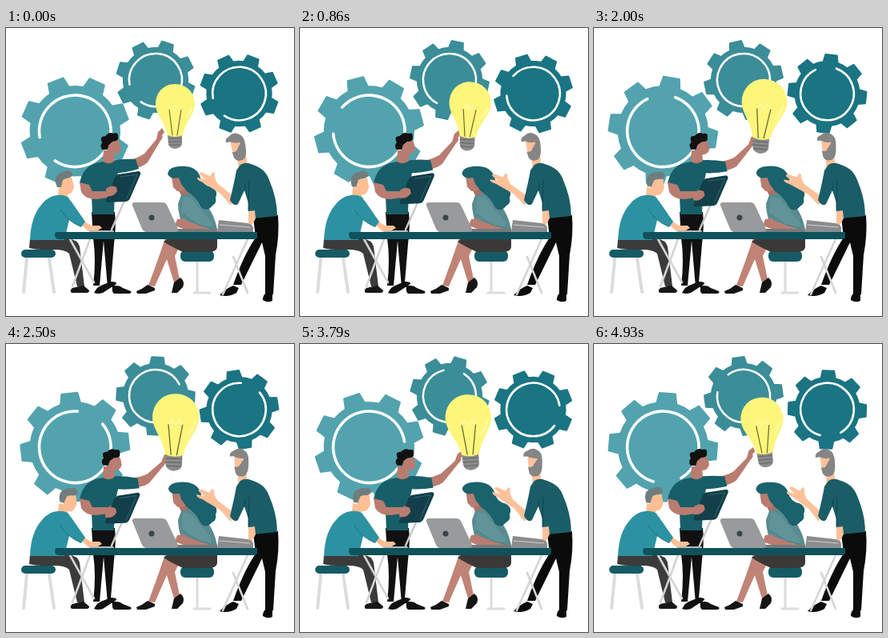
Animation, 360 px wide and 360 px high, one loop 5 s. Source, as an HTML page:

```html
<!DOCTYPE html>
<html lang="en">
<head>
<meta charset="utf-8">
<title>Team idea</title>
<style>
html, body { margin: 0; width: 100%; height: 100%; overflow: hidden; background: #fff; }
svg { display: block; width: 100vw; height: 100vh; }
.line { fill: none; stroke-linecap: round; stroke-linejoin: round; }
</style>
</head>
<body>
<svg viewBox="0 0 360 360">
  <g id="gears"></g>

  <!-- standing presenter -->
  <path fill="#111" d="M107 230H136Q138 247 135 270L131 318L138 324H127L122 266L117 322H109Q113 290 109 263Z"/>
  <path fill="#111" d="M110 331Q114 323 121 321L131 317Q139 317 138 320L121 331Q115 333 110 331ZM133 323Q141 320 146 325L156 329Q158 332 153 332H135Q132 330 133 323Z"/>
  <g id="reach">
    <path fill="#b97c70" d="M154 165Q164 163 173 157L188 139L190 130L195 125L198 130L195 134Q197 137 193 141L177 168Q170 175 151 178Z"/>
    <path fill="#175e68" d="M124 168Q142 163 162 164L166 176Q151 181 132 182Z"/>
  </g>
  <path fill="#175e68" d="M121 167Q135 164 142 170Q139 188 136 199L135 233H108L107 210L92 194Q96 174 112 169Z"/>
  <path fill="#b97c70" d="M122 153L135 153L136 166Q130 172 121 167Z"/>
  <g id="speakerHead">
    <path fill="#b97c70" d="M125 142Q135 137 142 142L144 150Q143 158 135 158Q126 156 125 142Z"/>
    <path fill="#111" d="M121 152Q117 147 121 143Q117 135 125 135Q130 129 135 132Q142 130 141 137Q142 142 134 142L129 146L127 152Z"/>
  </g>
  <path class="line" stroke="#c8cacb" stroke-width="2.5" d="M132 252L148 216"/>
  <path fill="#b97c70" d="M92 193L104 196L108 204L128 204L137 199L139 204L134 211L113 214Q99 214 94 205Z"/>
  <g id="tablet">
    <path fill="#123f49" d="M140 183L166 179Q169 180 168 183L155 213Q153 217 149 217L127 218Q123 217 126 213L136 187Z"/>
    <path class="line" stroke="#2f666f" stroke-width="1" d="M143 186L164 183L151 213"/>
    <path fill="#b97c70" d="M125 201Q132 195 138 199L139 204Q134 212 125 210Z"/>
  </g>

  <!-- left stool and seated man -->
  <path class="line" stroke="#dadcdd" stroke-width="4" d="M26 288L22 330M54 288L60 330"/>
  <rect x="19" y="277" width="43" height="10" rx="5" fill="#155b65"/>
  <path fill="#3c3b3b" d="M30 263H78Q90 265 92 273L98 323H89L79 282Q74 277 60 277Q40 278 29 275Z"/>
  <path fill="#171717" d="M83 325Q91 323 97 322L104 328Q104 331 101 331H82Q79 328 83 325Z"/>
  <path fill="#fdbf93" d="M66 199L79 202L76 216L65 211Z"/>
  <g id="writerHead">
    <path fill="#fdbf93" d="M66 189Q73 184 82 187L85 197Q84 207 78 208Q68 206 66 189Z"/>
    <path fill="#6f7d7f" d="M64 199Q60 191 63 185Q69 179 79 178L83 181Q84 187 75 188L71 190L69 199Z"/>
  </g>
  <path fill="#2c92a1" d="M64 209Q74 208 79 213Q83 222 79 240L73 265H30Q31 235 45 220Q53 210 64 209Z"/>
  <path fill="#fdbf93" d="M91 243L97 241L106 247L117 247L120 250L113 254H103Z"/>
  <path fill="#2c92a1" d="M69 223Q74 211 81 216L99 242L94 249Q79 243 69 228Z"/>
  <path class="line" stroke="#16707c" stroke-width=".8" d="M68 227Q76 241 93 248"/>

  <!-- seated woman -->
  <path class="line" stroke="#dadcdd" stroke-width="3" d="M239 290V330M235 331H255"/>
  <rect x="218" y="278" width="42" height="14" rx="6" fill="#155b65"/>
  <path fill="#c08476" d="M199 263L219 269L211 285L217 314L210 318L201 289L186 323L178 322L190 289Z"/>
  <path fill="#151515" d="M163 329Q171 326 177 321L186 325V328L175 332H164ZM207 331L210 318L218 312Q224 317 221 324L214 331Z"/>
  <path fill="#3b3938" d="M206 261H264V274Q263 280 253 280H221Q204 272 197 267Z"/>
  <path fill="#ad7064" d="M214 198L229 198L234 214L220 212Z"/>
  <path fill="#588b90" d="M219 209Q231 204 240 211Q259 225 264 252H222Q215 232 215 220Z"/>
  <path fill="#b97c70" d="M214 239L222 238Q231 246 254 246L252 253Q228 255 211 247Z"/>
  <path fill="#619499" d="M221 212Q231 208 239 222L258 244L256 251L239 246L219 232Z"/>
  <path class="line" stroke="#397983" stroke-width=".8" d="M220 232L240 246L257 250"/>
  <g id="womanHead">
    <path fill="#b97c70" d="M207 187Q213 184 220 185L227 199Q221 206 214 204L209 199Z"/>
    <path fill="#1a626c" d="M202 182Q203 174 216 173Q236 171 242 184Q245 197 257 199Q266 204 262 212Q264 219 258 222Q251 231 244 224Q238 211 226 204L219 195L216 187Q205 190 202 182Z"/>
  </g>

  <!-- right man -->
  <path fill="#0b0b0b" d="M309 236L340 234Q342 258 337 284L334 333H324L324 285L320 268L294 321H284Q297 284 312 262Z"/>
  <path fill="#0b0b0b" d="M267 334Q274 326 284 322L291 325L288 331Q278 337 267 334ZM321 340Q321 333 326 331L333 333V341Q327 344 321 340Z"/>
  <path fill="#fdc19a" d="M289 156L300 157L302 176L291 179Z"/>
  <g id="elderHead">
    <path fill="#fdc19a" d="M286 139H300V158H287Z"/>
    <path fill="#858586" d="M286 153Q291 155 293 151L299 143L304 148Q304 162 298 165Q289 167 287 160Z"/>
    <path fill="#858586" d="M281 140Q280 135 286 133Q293 128 299 133Q305 136 304 148L300 151L298 143Q290 143 286 140Z"/>
  </g>
  <g id="gesture">
    <path fill="#fdc19a" d="M281 222L268 207L257 200L246 193Q238 190 239 187L249 189L242 183Q241 180 246 181L255 185L259 180L261 182Q260 188 265 195L285 211Z"/>
  </g>
  <path fill="#1a5d67" d="M293 171Q299 167 306 170Q324 175 329 190Q339 213 339 235L309 238L304 222L298 203L290 220Q285 224 280 215Q286 190 288 178Z"/>
  <path fill="#fdc19a" d="M303 221L310 219L312 238L306 249H303Z"/>
  <path fill="#1a5d67" d="M302 181Q311 178 315 192L312 228L303 229Z"/>
  <path class="line" stroke="#0e444d" stroke-width=".9" d="M304 191L303 228M298 203L299 194"/>

  <!-- table and laptops -->
  <path class="line" stroke="#d2d4d5" stroke-width="2.6" d="M80 264L110 318M105 264L83 323M302 264L271 333M284 286L302 331"/>
  <path fill="#8b8c8d" d="M266 240L302 244Q309 246 309 250V255H264Z"/>
  <path class="line" stroke="#d0d0d0" stroke-width="1" d="M267 246L305 249"/>
  <path fill="#777a7b" d="M173 251H264V256H175Z"/>
  <path fill="#999a9b" d="M161 218H196Q199 218 201 221L215 251Q216 255 211 255H176Q172 255 170 251L158 222Q157 218 161 218Z"/>
  <circle cx="182" cy="237" r="3.5" fill="#35464a"/>
  <path class="line" stroke="#b9bcbd" stroke-width="2" d="M105 254H134"/>
  <path fill="#0f525c" d="M62 255H314V261Q314 264 310 264H66Q61 264 61 258Z"/>

  <!-- bulb -->
  <g id="bulb">
    <path fill="#8b8b8b" d="M202 133H220V145Q219 150 211 151Q204 150 203 145Z"/>
    <path class="line" stroke="#666" stroke-width="1" d="M203 138H219M203 142H219M204 146H218"/>
    <path fill="#fdf67a" d="M211 70C226 70 236 81 236 95C236 108 224 117 221 134Q211 138 202 134C199 117 187 108 187 95C187 81 197 70 211 70Z"/>
    <path class="line" stroke="#6a6540" stroke-width="1.1" d="M204 102L208 134M219 102L214 134"/>
    <path class="line" stroke="#fffab8" stroke-width="1" d="M204 102L208 97L211 103L215 97L219 102"/>
    <path class="line" stroke="#fff9b8" stroke-width="1.5" d="M232 98Q230 107 225 112"/>
  </g>
</svg>
<script>
const LOOP = 5000, STEPS = 70, CYCLE = 6000;
const $ = id => document.getElementById(id);
const SVG = "http://www.w3.org/2000/svg";

const polar = (r, deg) => {
  const a = deg * Math.PI / 180;
  return `${(r * Math.cos(a)).toFixed(2)} ${(r * Math.sin(a)).toFixed(2)}`;
};

function gearPath(r) {
  const root = r * .82, points = [];
  for (let a = 0; a < 360; a += 45) {
    points.push(polar(root, a - 13), polar(r, a - 8.5), polar(r, a + 8.5), polar(root, a + 13));
    points.push(polar(root, a + 22.5));
  }
  return `M${points.join("L")}Z`;
}

function add(parent, tag, attrs) {
  const node = document.createElementNS(SVG, tag);
  for (const key in attrs) node.setAttribute(key, attrs[key]);
  return parent.appendChild(node);
}

const gears = [
  { x: 86.3, y: 128.8, r: 68, ring: 44.8, width: 3.6, color: "#52a3ae", phase: 24, dir: 1 },
  { x: 187, y: 65, r: 49, ring: 33, width: 2.5, color: "#3b8d98", phase: 18, dir: -1 },
  { x: 291.5, y: 82, r: 49, ring: 33.3, width: 2.6, color: "#1a7482", phase: 21, dir: 1 }
];

for (const gear of gears) {
  gear.node = add($("gears"), "g", {});
  add(gear.node, "path", {
    d: gearPath(gear.r), fill: gear.color, stroke: gear.color,
    "stroke-width": 2, "stroke-linejoin": "round"
  });
  const from = polar(gear.ring, 170 - gear.phase), to = polar(gear.ring, 124 - gear.phase);
  add(gear.node, "path", {
    d: `M${from}A${gear.ring} ${gear.ring} 0 1 1 ${to}`,
    class: "line", stroke: "#fff", "stroke-width": gear.width
  });
}

// Linear interpolation through [time, value] stops.
function track(stops, t) {
  const i = stops.findIndex(s => s[0] > t);
  const [t0, a] = stops[i - 1], [t1, b] = stops[i];
  return a + (b - a) * (t - t0) / (t1 - t0);
}

const swell = [[0, 0], [CYCLE / 2, 1], [CYCLE, 0]];
const sway = [[0, 0], [CYCLE / 4, 1], [CYCLE * 3 / 4, -1], [CYCLE, 0]];

// id, stops, start angle, range, pivot
const joints = [
  ["reach", swell, 0, 11, 140, 182],
  ["speakerHead", swell, -2, 6, 129, 162],
  ["writerHead", swell, 0, 15, 72, 214],
  ["womanHead", swell, 0, 2, 228, 210],
  ["elderHead", swell, -11, 11, 295, 172],
  ["gesture", sway, 0, -5, 282, 217]
];

function draw(t) {
  for (const g of gears) {
    const angle = g.phase + g.dir * 360 * t / CYCLE;
    g.node.setAttribute("transform", `translate(${g.x} ${g.y}) rotate(${angle})`);
  }
  for (const [id, stops, start, range, x, y] of joints) {
    $(id).setAttribute("transform", `rotate(${start + range * track(stops, t)} ${x} ${y})`);
  }
  const grow = track(swell, t);
  $("tablet").setAttribute("transform", `translate(${-grow} ${8 * grow})`);
  $("bulb").setAttribute("transform",
    `translate(211.5 110.5) rotate(${7 * track(sway, t)}) scale(${1 + .23 * grow}) translate(-211.5 -110.5)`);
}

const begin = performance.now();
function tick(now) {
  const step = LOOP / STEPS;
  const t = Math.max(0, now - begin) % LOOP;
  draw(Math.floor((t + 2) / step) % STEPS * step);
  requestAnimationFrame(tick);
}
draw(0);
requestAnimationFrame(tick);
</script>
</body>
</html>
```
